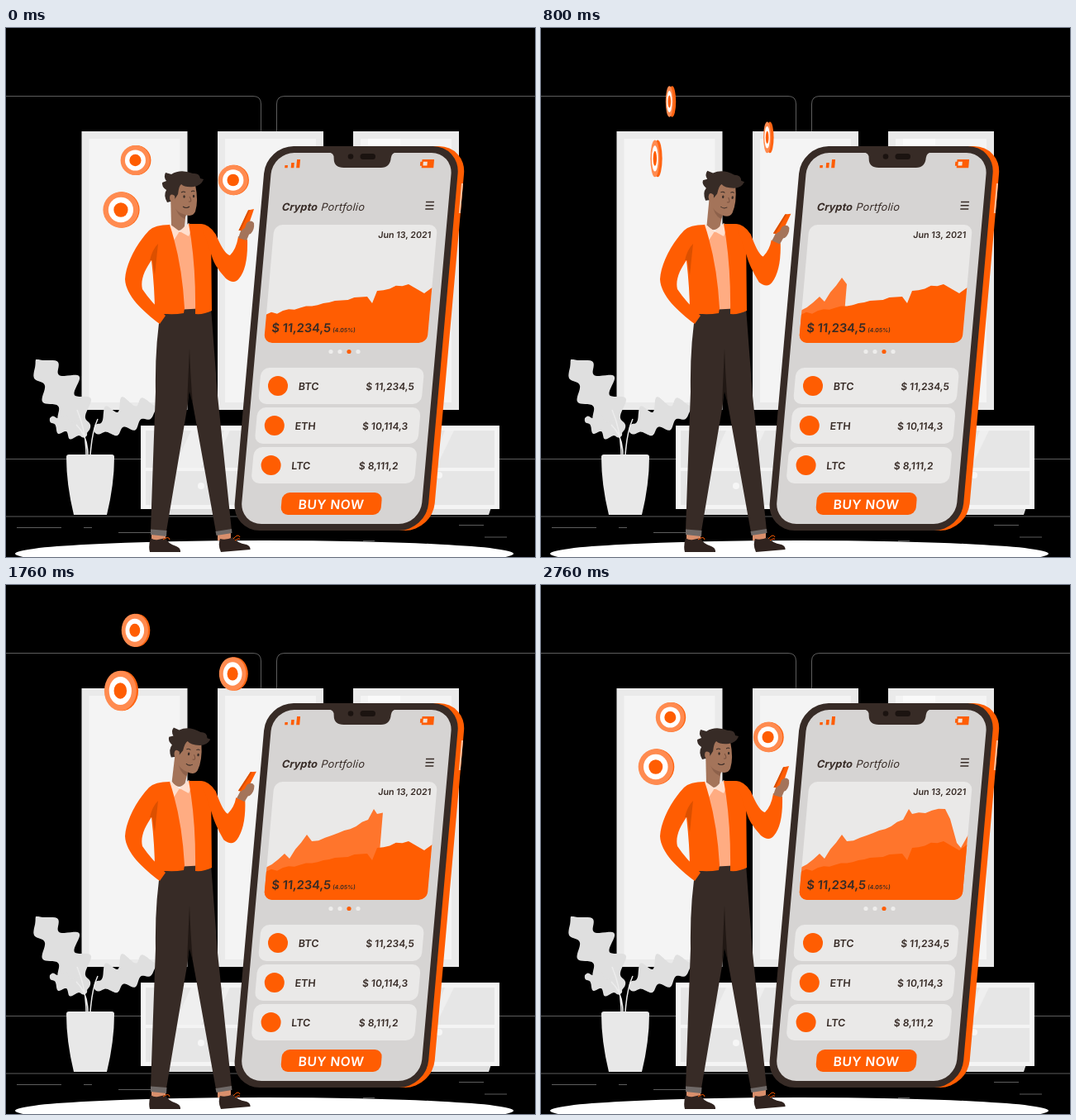
Write an HTML page that moves like this. It is 640 px wide and 640 px high and loops after 2.8 s.

```html
<!DOCTYPE html>
<html lang="en">
<head>
<meta charset="utf-8">
<title>Crypto Portfolio</title>
<style>
  html, body { margin: 0; width: 100%; height: 100%; overflow: hidden; background: #000; }
  svg { display: block; width: 100vw; height: 100vh; }
  text { font-family: Inter, "Open Sans", sans-serif; font-weight: 600; fill: #372b26; }
  .line { fill: none; stroke: #757575; stroke-width: .8; }
  .dark { fill: #372b26; }
  .orange { fill: #ff5d02; }
  .card { fill: #eae9e8; }
  .skin { fill: #a4745a; }
</style>
</head>
<body>
<svg viewBox="0 0 640 640">
  <defs>
    <clipPath id="cardClip"><rect x="333" y="238" width="197.5" height="143" rx="10" transform="matrix(1 0 -.0886 1 12.67 0)"/></clipPath>
    <clipPath id="reveal"><path id="front"/></clipPath>
  </defs>

  <!-- room -->
  <g class="line">
    <path d="M0 82.5H299Q308.5 82.5 308.5 92V126M640 82.5H337Q327.5 82.5 327.5 92V126"/>
    <path d="M0 521.5H640M0 591H640M13 604.5H67M94 604.5H104M136 610.5H175M548 601.5H578M579 616H606M432 620.5H446"/>
  </g>
  <g id="windows"></g>
  <rect x="438" y="134" width="39" height="10" fill="#fafafa"/>

  <path d="M178 580H262L258 589H182ZM500 580H587L584 589H500Z" fill="#dedede"/>
  <rect x="163" y="481" width="434" height="101" fill="#f4f4f4"/>
  <g id="drawers" fill="#e6e6e6"></g>
  <path d="M224 487H257L236 532H203ZM264 487H271L250 532H243ZM531 487H542L523 526V506Z" fill="#efefef"/>
  <circle cx="236" cy="554" r="4" fill="#f6f6f6"/><circle cx="524" cy="541" r="4" fill="#f6f6f6"/>

  <!-- plant -->
  <g id="leaves" fill="#dfdfdf"></g>
  <path d="M97 517Q97 488 86 462M102 517Q104 488 111 473M99 517Q99 493 85 480" fill="none" stroke="#ededed" stroke-width="1.5"/>
  <path d="M73 519Q73 516 76 516H128Q131 516 131 519Q131 552 122 589H82Q73 552 73 519Z" fill="#e8e8e8"/>

  <ellipse cx="312.5" cy="636" rx="301.5" ry="16" fill="#fff"/>

  <!-- large phone: group is sheared about its top edge -->
  <g transform="matrix(1 0 -.0886 1 12.67 0)">
    <rect class="orange" x="322" y="143" width="235" height="465" rx="33"/>
    <rect x="555" y="188" width="2" height="36" fill="#ffc4a2"/>
    <rect class="dark" x="315" y="143" width="234.5" height="465" rx="33"/>
    <rect x="323.5" y="151" width="218" height="449" rx="26" fill="#d6d4d3"/>
    <path class="dark" d="M390 150Q398 151 398 158Q399 169 411 169H456Q467 169 467 157Q467 151 474 150Z"/>
    <g class="orange">
      <path d="M339.5 166h3.5v3.3h-3.5zM347 163h3.6v6.3h-3.6zM353.5 159h4v10.3h-4zM505 159h14.5v10.3H505v-2.5h-2v-5h2z"/>
      <rect x="371.5" y="562" width="121" height="27" rx="9"/>
    </g>
    <path d="M506.500 161.800h5v4.700h-5z" fill="#f0e2da"/>
    <path d="M514 210.500h10M514 214.700h10M514 219h10" stroke="#372b26" stroke-width="1.500"/>
    <rect class="card" x="333" y="238" width="197.500" height="143" rx="10"/>
    <g id="rows"></g>
  </g>
  <circle cx="417" cy="155.500" r="3.300" fill="#1b1310"/>
  <rect x="428.500" y="152" width="18.500" height="7" rx="3.500" fill="#1b1310"/>
  <g clip-path="url(#cardClip)">
    <path id="high" fill="#ff752c" clip-path="url(#reveal)"/>
    <path id="low" class="orange"/>
  </g>
  <g id="dots"></g>
  <g id="labels"></g>

  <!-- legs and shoes -->
  <path d="M176 610H193V620H176ZM256 609H272V620H256Z" fill="#d98f6c"/>
  <path d="M175 617Q179 620 184 619L193 617Q196 624 206 627Q211 629 211 633V634H174Q172 627 175 617ZM259 618Q266 620 275 616Q279 623 291 625Q296 627 295.500 631L260 634Q256 626 259 618Z" fill="#30231f"/>
  <path d="M190 619q7-5 8 0M275 618q6-7 8-2M277 620q7-4 5-1" fill="none" stroke="#ff5d02"/>
  <path class="dark" d="M188 338H248Q252 392 256 445L273 608L254 610L226 455L222 432L220 455L194 609L175 608Q178 520 181 440Q180 382 188 338Z"/>
  <path d="M222 388L219 455L222 440L226 455Q223 420 222 388Z" fill="#211814"/>
  <path d="M175 606.500L194.500 608L194 615L175 613ZM253.500 609L273 606L273.500 611L254.500 614Z" fill="#6f6967"/>

  <!-- figure -->
  <path d="M196 241L211 247L225 240L242 339L205 341Z" fill="#ffac82"/>
  <g id="head">
    <path class="skin" d="M199 200L218 220L216 240Q209 250 200 240Z"/>
    <path d="M203 213L218 226L216 231Q207 227 203 213Z" fill="#8d614b"/>
    <path class="skin" d="M200 191Q214 181 229 190Q233 209 229 222Q226 229 217 226Q207 224 200 213Z"/>
    <path class="dark" d="M195 211Q190 202 194 196Q188 192 189 187L194 185Q190 180 193 175L200 177Q211 170 226 176Q234 175 235 182L239 183Q236 191 227 192Q216 193 212 189Q209 191 208 201L203 209Z"/>
    <path class="skin" d="M204 203Q198 199 198 206Q199 213 205 211Z"/>
    <g fill="none" stroke="#372b26">
      <path d="M212 199q3-2 5 0M224 198q3-2 4 0M214 216q4 3 8 0"/>
      <path d="M222 204q3 5 1 6h-2" stroke="#77503e"/>
    </g>
    <ellipse class="dark" cx="215.500" cy="204" rx="1.200" ry="1.800"/><ellipse class="dark" cx="227" cy="203.500" rx="1.200" ry="1.800"/>
  </g>
  <path d="M198 237L210 246L203 257Q196 249 196 240ZM221 236L210 246L221 252Q225 244 223 238Z" fill="#ffdfce"/>
  <path class="orange" d="M198 238Q180 238 173 245C157 262 145 286 144 304C145 324 166 343 186 358L193 348Q175 331 165 316C162 304 169 291 176 281Q180 316 180 344Q198 348 215 345L216 339Q213 283 198 238Z"/>
  <path d="M184 261Q177 268 174 281L177 281L180 299Z" fill="#dc5000"/>
  <path class="orange" d="M221 237H235Q244 238 248 246L249 342Q239 347 229 346Q230 286 221 237Z"/>
  <path id="sleeve" class="orange"/>
  <g id="hand">
    <path class="skin" d="M281 254L286 240L296 245L291 257Z"/>
    <path class="orange" d="M293 220.500L300 219L291 245.500L281.500 245Z"/>
    <path d="M293 220.500L295 220L284 245H281.500Z" fill="#d94f00"/>
    <path class="skin" d="M291 236Q297 231 300 236Q301 244 296 249Q289 252 285 249Q283 245 289 242Z"/>
  </g>

  <g id="coins"></g>
</svg>
<script>
const LOOP = 2800, PEAK = 1385;
const $ = id => document.getElementById(id);
const add = (parent, tag, attrs, content = '') => {
  const el = document.createElementNS('http://www.w3.org/2000/svg', tag);
  for (const k in attrs) el.setAttribute(k, attrs[k]);
  el.textContent = content;
  return parent.appendChild(el);
};

for (const x of [91.5, 256, 420]) {
  add($('windows'), 'rect', { x, y: 125, width: 128, height: 337, fill: '#eaeaea' });
  add($('windows'), 'rect', { x: x + 9, y: 134, width: 110, height: 319, fill: '#f4f4f4' });
}
for (const x of [169, 383]) {
  add($('drawers'), 'rect', { x, y: 487, width: 208, height: 45 });
  add($('drawers'), 'rect', { x, y: 536, width: 208, height: 41 });
}

// lobed leaf from base to tip; left and right are the half widths
function leaf(bx, by, tx, ty, left, right, lobes) {
  const dx = tx - bx, dy = ty - by, len = Math.hypot(dx, dy);
  const side = (s, w) => {
    const out = w * Math.sin(Math.PI * s) ** .6 * (.72 + .28 * Math.cos(2 * Math.PI * lobes * s));
    return [bx + dx * s - dy / len * out, by + dy * s + dx / len * out].map(v => v.toFixed(1));
  };
  const pts = [];
  for (let i = 0; i <= 60; i++) pts.push(side(i / 60, right));
  for (let i = 60; i >= 0; i--) pts.push(side(i / 60, -left));
  add($('leaves'), 'path', { d: `M${pts.join('L')}Z` });
}
leaf(98, 490, 36, 401, 23, 32, 3.5);
leaf(107, 489, 183, 459, 28, 16, 3.5);
leaf(98, 493, 53, 472, 14, 13, 3);

const label = (x, y, size, str, more) =>
  add($('labels'), 'text', { 'font-size': size, transform: `translate(${x} ${y}) skewX(-5)`, ...more }, str);

[['BTC', '$ 11,234,5'], ['ETH', '$ 10,114,3'], ['LTC', '$ 8,111,2']].forEach(([name, price], i) => {
  const y = 411 + 48 * i, dx = -4.2 * i;
  add($('rows'), 'rect', { class: 'card', x: 332.5, y, width: 197.5, height: 44, rx: 10 });
  add($('dots'), 'circle', { class: 'orange', cx: 329 + dx, cy: y + 22, r: 12 });
  label(353.5 + dx, y + 26.5, 12.5, name);
  label(435 + dx, y + 26.5, 12, price);
});
for (let i = 0; i < 4; i++)
  add($('dots'), 'circle', { cx: 393 + 11 * i, cy: 391.5, r: 2.6, fill: i === 2 ? '#ff5d02' : '#eeedec' });

label(333.5, 221, 12.8, 'Crypto', { style: 'font-weight:700;font-style:italic' });
label(381, 221, 12.8, 'Portfolio', { style: 'font-weight:400;font-style:italic', 'letter-spacing': '.25' });
label(514, 254, 10.7, 'Jun 13, 2021', { 'text-anchor': 'end' });
label(321, 368, 14.7, '$ 11,234,5');
label(395, 368, 7, '(4.05%)');
label(393, 581.5, 15.6, 'BUY NOW', { 'text-anchor': 'middle', 'letter-spacing': '.5', style: 'fill:#fff' });

// market curve: a few turning points, roughened by seeded noise
let seed = 7;
const random = () => (seed = seed * 16807 % 2147483647) / 2147483647;
function market(turns, rough) {
  let d = 'M305 390V345';
  turns.forEach(([x, y], i) => {
    d += `L${x} ${y}`;
    const [nx, ny] = turns[i + 1] || [x, y], n = Math.floor((nx - x) / 7);
    for (let j = 1; j < n; j++)
      d += `L${x + (nx - x) * j / n} ${y + (ny - y) * j / n + (random() - .5) * rough}`;
  });
  return d + 'L530 390Z';
}
$('low').setAttribute('d', market([[314, 347], [398, 330], [437, 325], [443, 333], [449, 318], [487, 310], [506, 321], [517, 313]], 3.5));
$('high').setAttribute('d', market([[314, 342], [337, 325], [343, 331], [364, 302], [370, 310], [402, 300], [438, 284], [445, 271], [449, 277], [489, 271], [495, 283], [503, 312], [508, 318], [517, 302]], 4));

const coins = [[139.5, 220, 119, 21.7], [157, 160, 136, 18], [275.3, 184, 99, 18.2]].map(([x, y, rise, r]) => {
  const g = add($('coins'), 'g', {});
  const disc = (fill, size) => [add(g, 'ellipse', { fill }), size];
  return { x, y, rise, r, g, discs: [disc('#ff6412', 1), disc('#ff8b50', 1), disc('#fff', .7), disc('#ff5d02', .4)] };
});

function draw(now) {
  const t = now % LOOP;
  const swell = (1 + Math.cos(2 * Math.PI * (t - PEAK) / LOOP)) / 2;
  const lift = swell ** 1.4, lean = swell ** .6;
  // two turns, fastest just after the peak
  const angle = 4 * Math.PI / (1 + Math.exp(-8.7 * (t / LOOP - .532)));

  for (const c of coins) {
    const r = c.r * (1 + .25 * lift ** 3);
    const w = Math.abs(Math.cos(angle)), edge = .4 + 1.3 * Math.abs(Math.sin(angle));
    c.g.setAttribute('transform', `translate(${c.x} ${c.y - c.rise * lift})`);
    c.discs.forEach(([el, size], i) => {
      el.setAttribute('cx', i ? -edge : edge);
      el.setAttribute('rx', r * size * w);
      el.setAttribute('ry', r * size);
    });
  }

  const x = 301 + .0866 * t;
  $('front').setAttribute('d', `M290 220H${x + 7}L${x - 7} 390H290Z`);

  $('head').setAttribute('transform', `translate(${lean} ${-lean}) rotate(${9 * lean} 209 238)`);
  $('hand').setAttribute('transform', `translate(0 ${6 * lean}) rotate(${9 * lean} 291 240)`);
  $('sleeve').setAttribute('d', `M235 237Q246 237 254 250Q${264 - 2 * lean} 274 ${271 - 3 * lean} ${275 + 2 * lean}`
    + `q8-8 10 ${4 * lean - 23}l11 4q1 ${34 - 3 * lean}-10 47q-6 8-16 0Q252 288 249 276L240 250Z`);
}
function tick() {
  draw(performance.now());
  requestAnimationFrame(tick);
}
tick();
</script>
</body>
</html>
```
